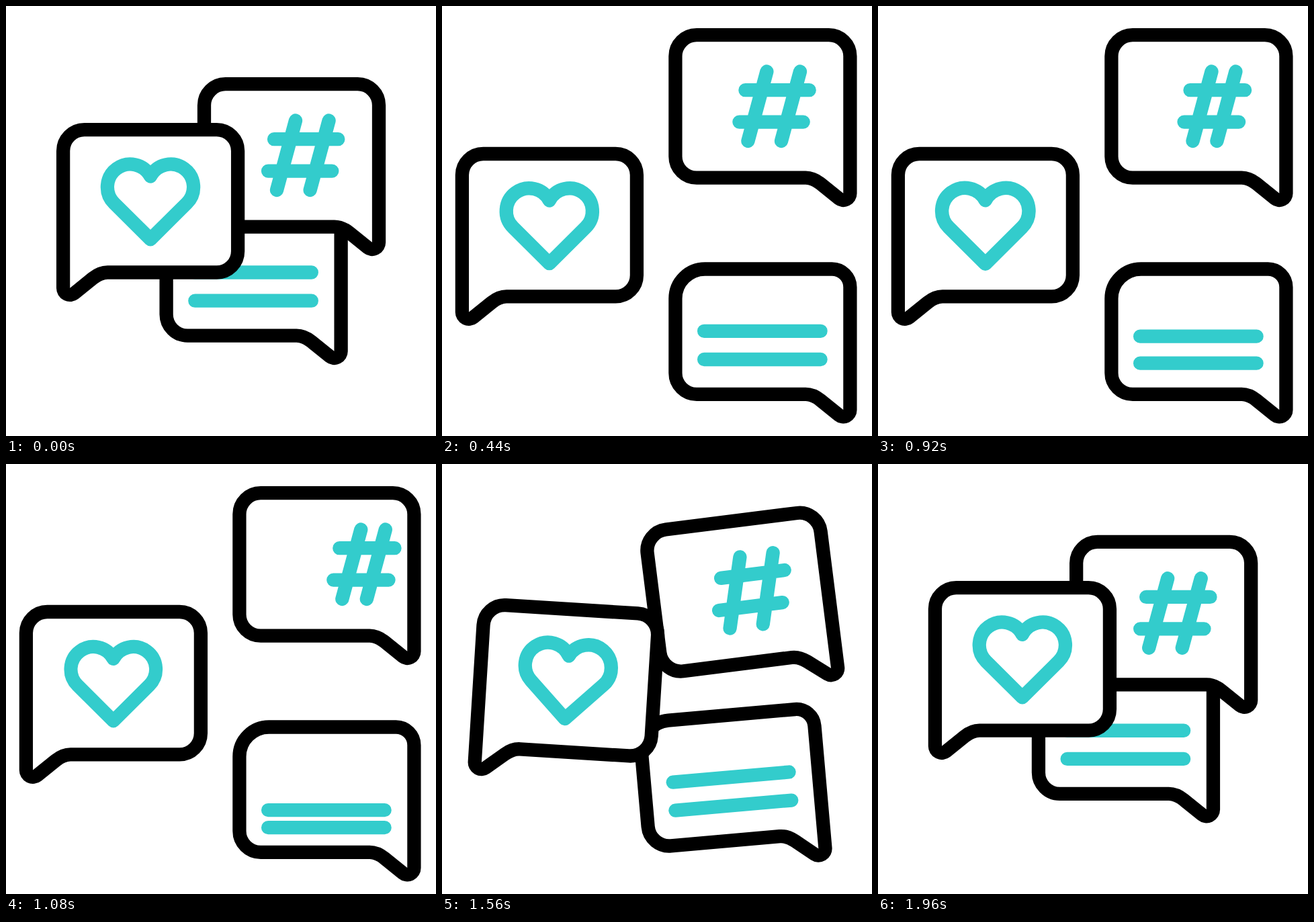
An HTML page that plays this animation: 640 px wide and 640 px high, repeating every 2000 ms.

```html
<!DOCTYPE html>
<html lang="en">
<head>
<meta charset="utf-8">
<title>Chat bubbles</title>
<style>
  html, body { margin: 0; width: 100%; height: 100%; overflow: hidden; background: #fff; }
  svg { display: block; width: 100%; height: 100%; }
  path { fill: none; stroke: #3cc; stroke-width: 20.3; stroke-linecap: round; stroke-linejoin: round; }
  .box { fill: #fff; stroke: #000; }
</style>
</head>
<body>
<svg id="stage" viewBox="0 0 640 640"></svg>
<script>
const LOOP = 2000, STEP = 40;
const stage = document.getElementById('stage');

function add(parent, tag, attrs = {}) {
  const el = document.createElementNS('http://www.w3.org/2000/svg', tag);
  for (const key in attrs) el.setAttribute(key, attrs[key]);
  return parent.appendChild(el);
}

// Cubic easing whose handles start and end flat: (x1, 0) and (x2, 1).
const ease = (x1, x2) => x => {
  let lo = 0, hi = 1;
  for (let i = 0; i < 24; i++) {
    const s = (lo + hi) / 2, r = 1 - s;
    if (3 * r * r * s * x1 + 3 * r * s * s * x2 + s * s * s < x) lo = s; else hi = s;
  }
  return lo * lo * (3 - 2 * lo);
};
const soft = ease(.5, .5);

// Keys are [time, value, easing towards this key].
function track(keys, t) {
  if (t <= keys[0][0]) return keys[0][1];
  for (let i = 1; i < keys.length; i++) {
    const [t1, v1, fn = soft] = keys[i], [t0, v0] = keys[i - 1];
    if (t < t1) return v0 + (v1 - v0) * fn((t - t0) / (t1 - t0));
  }
  return keys[keys.length - 1][1];
}

const spread = [[0, 0], [440, 1, ease(.6, .66)], [1200, 1], [2000, 0, ease(.6, .47)]];
const tilt = [[0, 0], [280, 1, ease(.5, .75)], [440, 0, ease(.33, .67)], [1200, 0],
              [1680, 1, ease(.6, .75)], [1960, 0, ease(.33, .4)]];
const swing = (first, second, peak = 1040) => [[440, 0], [740, first], [peak, second], [1240, 0]];
const hashLeft = swing(-65, 48), hashRight = swing(-78, 34);
const lineTop = swing(-49.5, 33.5), lineLow = swing(-59.5, 19, 1000);

// Outline around the tail tip at 0,0, with the tail on the left.
function outline(top, near, far) {
  const l = -10.1, r = 249.9, b = -23.1, c = 31.6;
  return `M${l} 0V${top + near}A${near} ${near} 0 0 1 ${l + near} ${top}H${r - far}` +
    `A${far} ${far} 0 0 1 ${r} ${top + far}V${b - c}A${c} ${c} 0 0 1 ${r - c} ${b}` +
    `H56Q45 ${b} 34 -14.3L6.4 8A10.1 10.1 0 0 1 ${l} 0Z`;
}

// Each bubble turns about the outer edge of its tail (x, y) while it travels by (dx, dy).
function bubble(x, y, dx, dy, angle, side, top, near, far) {
  const g = add(stage, 'g');
  add(g, 'path', { class: 'box', d: outline(top, near, far), transform: `scale(${side} 1)` });
  const inner = add(g, 'g', { transform: `translate(${-x} ${-y})` });
  const pose = (k, turn) => g.setAttribute('transform',
    `translate(${x + dx * k} ${y + dy * k}) rotate(${angle * turn} ${-6 * side} 6)`);
  return { inner, pose };
}

const note = bubble(488.5, 513.7, 108.8, 87.3, -7, -1, -209.5, 27, 44);
const tag = bubble(544.9, 351.7, 52.4, -73, -10, -1, -235.5, 31.6, 31.6);
const like = bubble(95.2, 419.6, -55.2, 35.9, 5, 1, -235.5, 31.6, 31.6);
const bubbles = [note, tag, like];

const lines = add(note.inner, 'path');
const hash = add(tag.inner, 'path');
const heart = add(like.inner, 'path', {
  d: 'M215 347.3L161 293.6A34 34 0 1 1 215 253.6A34 34 0 1 1 269 293.6Z'
});

function draw(t) {
  const k = track(spread, t), turn = track(tilt, t);
  bubbles.forEach(b => b.pose(k, turn));

  const a = track(hashLeft, t), b = track(hashRight, t);
  hash.setAttribute('d', `M${399 + a} 198.2H${494.3 + b}M${390 + a} 245.6H${485.3 + b}` +
    `M${431 + a} 170.5L${403 + a} 274M${480.6 + b} 170.5L${452.6 + b} 274`);

  lines.setAttribute('d', `M281.3 ${396.5 + track(lineTop, t)}h173.5` +
    `M281.3 ${438.7 + track(lineLow, t)}h173.5`);

  // Two heartbeats while the bubbles are apart.
  const beat = (t - 440) / 326;
  const size = beat > 0 && beat < 2 ? 1 + .054 * Math.sin(beat * 2 * Math.PI) : 1;
  heart.setAttribute('transform', `translate(215 291.5) scale(${size}) translate(-215 -291.5)`);
}

const start = performance.now();
function tick() {
  const t = (performance.now() - start) % LOOP;
  draw(Math.floor(t / STEP) * STEP);
  requestAnimationFrame(tick);
}
tick();
</script>
</body>
</html>
```
